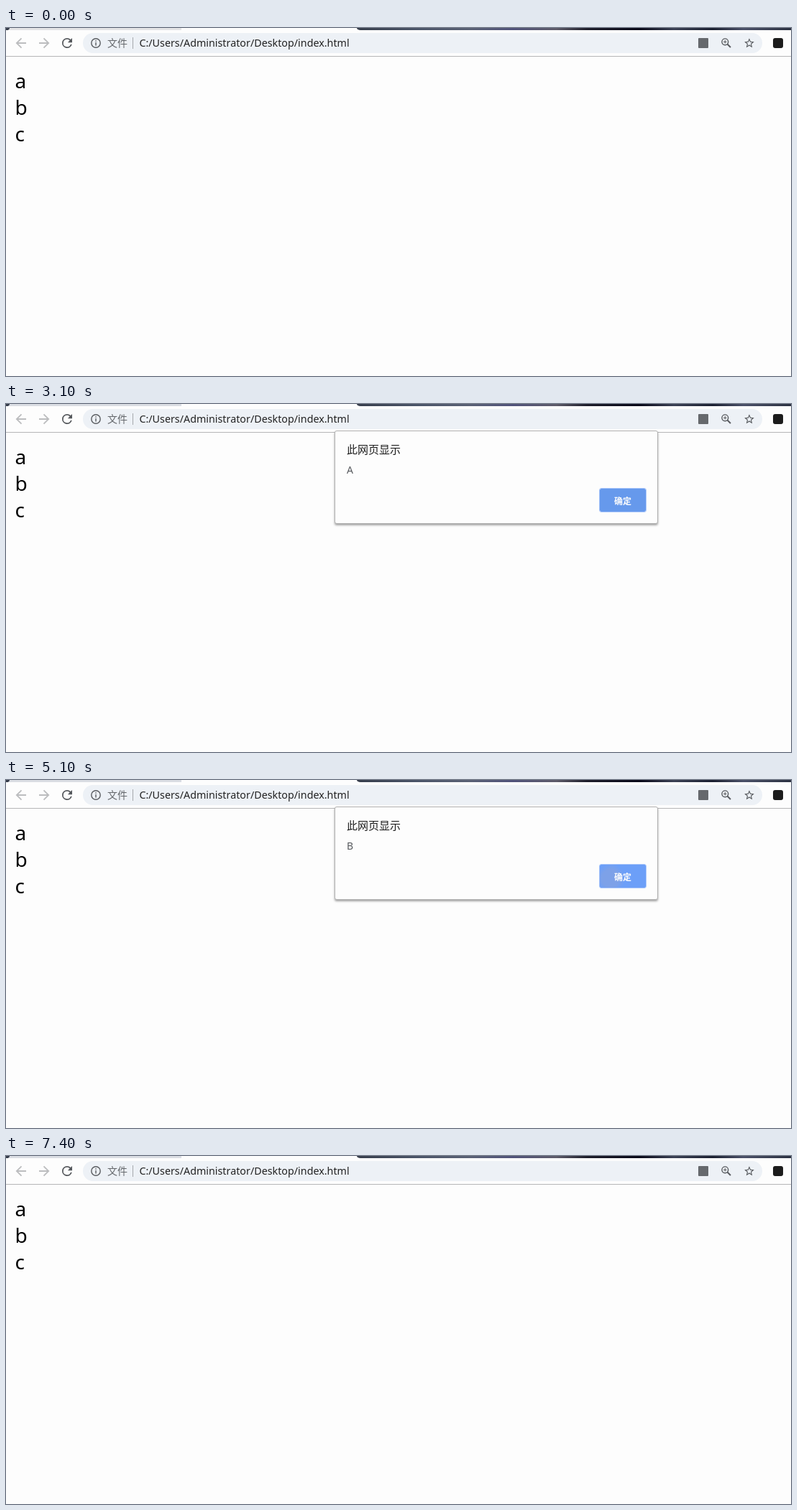
An HTML page that plays this animation: 1092 by 485 pixels, repeating every 8 s.

```html
<!DOCTYPE html>
<html lang="zh-CN">
<head>
<meta charset="utf-8">
<title>index.html</title>
<style>
  html, body { margin: 0; width: 100%; height: 100%; overflow: hidden; background: #fdfdfd; }
  body { position: relative; font-family: "Noto Sans", "Noto Sans CJK SC", sans-serif; }
  svg { position: absolute; left: 0; top: 0; }
  .cjk, #dialog { font-family: "Noto Sans CJK SC", "Noto Sans", sans-serif; }
  #strip {
    position: absolute; left: 488px; top: 0; width: 604px; height: 3px;
    border-bottom-left-radius: 5px 3px;
    background: linear-gradient(90deg, #363d4b, #4a5468 14%, #596074 26%, #50527a 36%, #5d5b69 46%,
      #1d1d2a 53%, #080818 65%, #3a4054 73%, #1a1f30 82%, #4a5068 89%, #2a3040);
  }
  #dialog {
    position: absolute; left: 457px; top: 37px; width: 448px; height: 128px;
    border: 1px solid #b2b2b2; border-radius: 3px; background: #fdfdfd;
    box-shadow: 0 2px 3px rgba(0, 0, 0, .36); visibility: hidden;
  }
  #dialog div { position: absolute; white-space: nowrap; }
  #title { left: 16px; top: 14px; font-size: 15px; line-height: 22px; color: #1c1c1c; }
  #message { left: 16px; top: 44px; font: 14px/20px "Noto Sans", sans-serif; color: #56595d; }
  #ok {
    left: 367px; top: 79px; width: 64px; height: 32px;
    border: 1px solid #a9c6fa; border-radius: 3px; background-clip: padding-box;
    font-size: 12px; font-weight: 700; line-height: 33px; text-align: center; color: #fdfdfd;
  }
</style>
</head>
<body>
<div id="strip"></div>
<svg width="1092" height="485" viewBox="0 0 1092 485">
  <path d="M0 0H5V2L3 3H0Z" fill="#363d4b"/>
  <path id="tab" d="M5 0H244V3H3Q5 2 5 0Z"/>
  <path d="M0 39.5H1092" stroke="#b5b5b7"/>
  <rect x="107" y="7" width="945" height="28" rx="14" fill="#edf1f6"/>
  <g fill="none" stroke="#bcbdbf" stroke-width="1.8">
    <path d="M28 21H15M21.5 14.3L14.8 21L21.5 27.7"/>
    <path d="M46 21H59M52.5 14.3L59.2 21L52.5 27.7"/>
  </g>
  <path id="reload" transform="translate(74.5 10.5) scale(.875)" fill="#55585c"
    d="M17.65 6.35A7.96 7.96 0 0 0 12 4a8 8 0 1 0 7.73 10h-2.08A6 6 0 1 1 12 6c1.66 0 3.14.69 4.22 1.78L13 11h7V4z"/>
  <path id="stop" d="M79.5 15.5L90.5 26.5M90.5 15.5L79.5 26.5" stroke="#55585c" stroke-width="1.8"/>
  <g fill="none" stroke="#5a5d61" stroke-width="1.4">
    <circle cx="125" cy="21" r="6.2"/>
    <path d="M125 20V24.5M125 17.3V18.8"/>
    <circle cx="1000.3" cy="19.3" r="4.4"/>
    <path d="M1003.5 22.5L1008 27" stroke-width="1.9"/>
    <path d="M998 19.3H1002.6M1000.3 17V21.6" stroke-width="1"/>
  </g>
  <path d="M176.5 13V29" stroke="#a5a8ac"/>
  <path transform="translate(1025.8 12.9) scale(.68)" fill="#55585c"
    d="M22 9.24l-7.19-.62L12 2 9.19 8.63 2 9.24l5.46 4.73L5.82 21 12 17.27 18.18 21l-1.63-7.03zM12 15.4l-3.76 2.27 1-4.28-3.32-2.88 4.38-.38L12 6.1l1.71 4.04 4.38.38-3.32 2.88 1 4.28z"/>
  <rect x="963" y="14" width="14" height="14" rx="1" fill="#66696d"/>
  <rect x="1067" y="14" width="14" height="14" rx="3" fill="#1c1c1c"/>
  <text class="cjk" x="141" y="26" font-size="14" fill="#65686c">文件</text>
  <text x="185.4" y="26" font-size="14.3" fill="#222">C:/Users/Administrator/Desktop/index.html</text>
  <g font-size="28" fill="#000">
    <text x="12.5" y="84">a</text>
    <text x="12.5" y="121">b</text>
    <text x="12.5" y="158">c</text>
  </g>
</svg>
<div id="dialog">
  <div id="title">此网页显示</div>
  <div id="message"></div>
  <div id="ok">确定</div>
</div>
<script>
const LOOP = 8000;
const IDLE = '#4285f4';
const RIPPLE = 'radial-gradient(circle at 15px 19px, #7da1e8 12px, #6c9ff8 20px)';
const PRESSED = '#6699ec';

// start time, message, opacity, button fill
const steps = [
  [0, '', 0, IDLE],
  [2100, 'A', .42, IDLE], [2200, 'A', 1, IDLE],
  [3100, 'A', 1, PRESSED], [3300, 'A', .5, PRESSED], [3400, '', 0, IDLE],
  [4400, 'B', .53, IDLE], [4500, 'B', 1, IDLE],
  [5100, 'B', 1, RIPPLE], [5200, 'B', 1, PRESSED], [5300, 'B', .12, PRESSED], [5400, '', 0, IDLE],
  [6300, 'C', .27, IDLE], [6400, 'C', .9, IDLE], [6500, 'C', 1, IDLE],
  [7200, 'C', 1, PRESSED], [7300, 'C', .37, PRESSED], [7400, '', 0, IDLE]
];

const el = id => document.getElementById(id);
const dialog = el('dialog'), message = el('message'), ok = el('ok');
const start = performance.now();

function draw(now) {
  const t = Math.max(0, now - start) % LOOP;
  const [, text, alpha, fill] = steps.findLast(step => step[0] <= t);
  const away = 1 - alpha;
  dialog.style.visibility = alpha ? 'visible' : 'hidden';
  dialog.style.opacity = alpha;
  dialog.style.transform = away
    ? `translateY(${-20 * away}px) perspective(1000px) rotateX(${10 * away}deg) scale(${1 + .003 * away}, ${1 + .02 * away})`
    : 'none';
  message.textContent = text;
  ok.style.backgroundImage = fill === RIPPLE ? fill : 'none';
  ok.style.backgroundColor = fill === RIPPLE ? IDLE : fill;

  const loading = t >= 600 && t < 700;
  el('reload').style.display = loading ? 'none' : '';
  el('stop').style.display = loading ? '' : 'none';
  el('tab').setAttribute('fill', t < 200 ? '#e4e4e6' : '#dadde3');
  requestAnimationFrame(draw);
}
draw(start);
</script>
</body>
</html>
```
